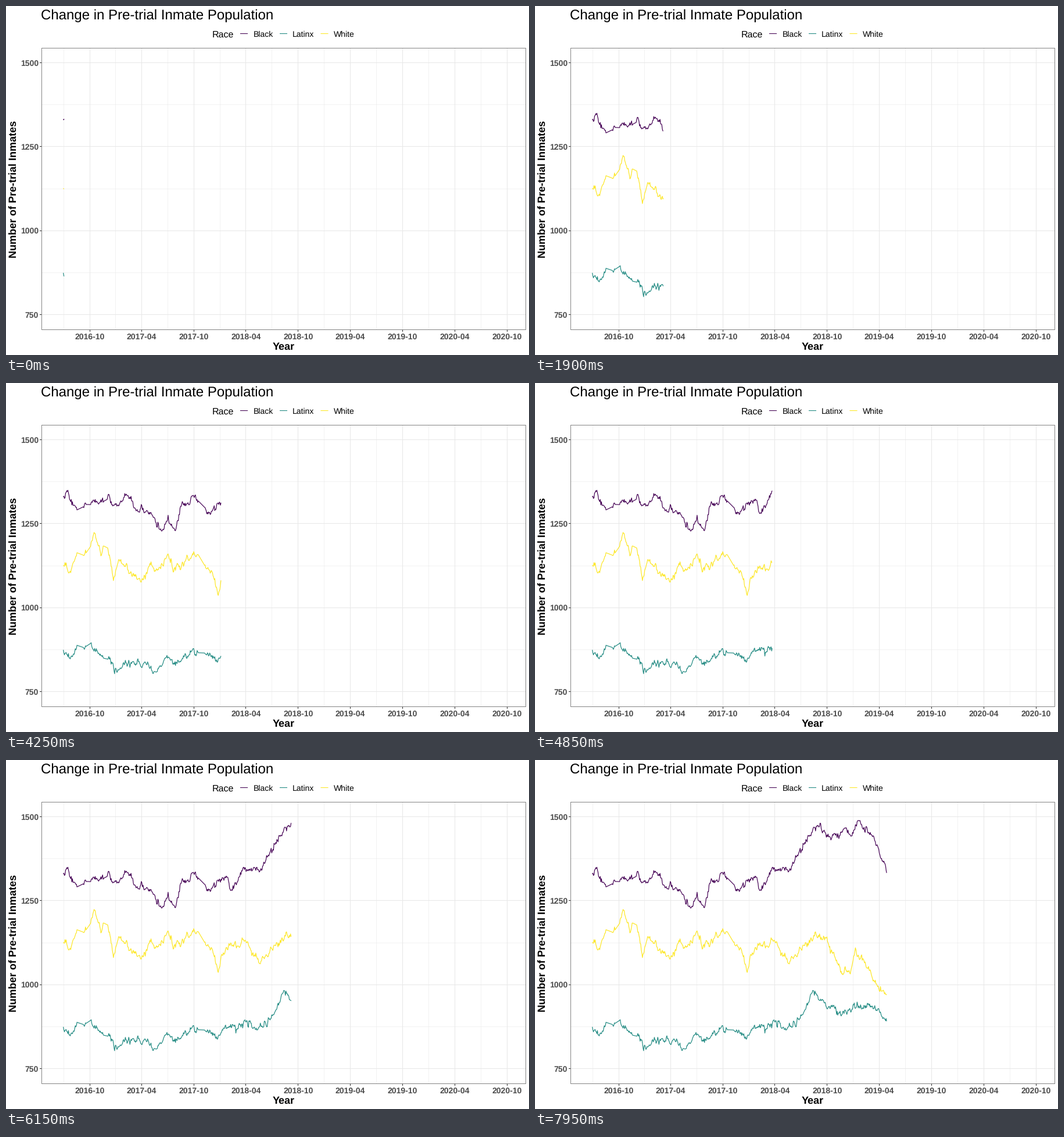
Recreate the animation shown at these times as a matplotlib script. Size 900 by 600 pixels, loop 8 s.

```python
import numpy as np
import matplotlib
import matplotlib.pyplot as plt
from matplotlib.animation import FuncAnimation

matplotlib.rcParams["font.family"] = "Liberation Sans"
matplotlib.rcParams["text.hinting"] = "none"

W, H, DPI = 900, 600, 100
PT = 72 / DPI                      # points per pixel
FRAMES, INTERVAL = 160, 50
START, SPEED = 99.8, 3.1777        # reveal edge: first position, px per frame
LEFT, RIGHT, TOP, BOTTOM = 61.5, 894.5, 72.5, 556.5
GRID, DARK, GREY = "#E8E8E8", "#333333", "#4D4D4D"

# stretches without observations, bridged by straight lines
GAPS = [(122.5, 132), (138, 145.5), (169, 174), (331.5, 341)]

# main turns of each trend, in pixels
BLACK = [(98, 199), (105, 187), (119, 216), (147, 204), (180, 200),
         (186, 218), (207, 189), (228, 216), (250, 224), (266, 254),
         (278, 233), (290, 256), (301, 214), (322, 194), (350, 220),
         (378, 198), (390, 222), (408, 190), (437, 186), (487, 114),
         (508, 134), (535, 122), (544, 141), (555, 101), (580, 130),
         (606, 188)]
LATINX = [(98, 458), (110, 472), (122, 459), (146, 449), (162, 468),
          (178, 472), (186, 492), (197, 492), (207, 479), (235, 483),
          (262, 494), (276, 470), (290, 486), (306, 469), (350, 460),
          (365, 482), (374, 458), (400, 461), (411, 447), (437, 462),
          (460, 439), (477, 398), (503, 421), (528, 439), (550, 422),
          (585, 426), (606, 448)]
WHITE = [(98, 311), (110, 325), (122, 297), (138, 293), (153, 263),
         (164, 290), (175, 288), (185, 333), (195, 309), (236, 339),
         (248, 309), (262, 329), (278, 292), (288, 319), (300, 318),
         (323, 290), (347, 312), (365, 361), (374, 328), (390, 314),
         (415, 315), (437, 349), (465, 318), (486, 302), (502, 312),
         (528, 360), (543, 362), (552, 325), (594, 396), (606, 408)]


def daily(turns, seed, step=0.98, memory=0.65, spread=3):
    """Trend through the turns plus day-to-day noise that fades slowly."""
    x = np.arange(98.6, 606.5, step)
    shocks = np.random.default_rng(seed).normal(0, spread, x.size)
    noise = np.convolve(shocks, memory ** np.arange(12))[:x.size]
    y = np.interp(x, *zip(*turns)) + np.clip(noise, -9, 9)
    seen = [not any(a < v < b for a, b in GAPS) for v in x]
    return x[seen], y[seen]


# name, colour, legend key x, legend text x, data
SERIES = [
    ("Black", "#440154", 403, 425.5, daily(BLACK, 4)),
    ("Latinx", "#218A82", 471, 492.5, daily(LATINX, 11)),
    ("White", "#FDE725", 541.5, 563.5, daily(WHITE, 23)),
]

fig = plt.figure(figsize=(W / DPI, H / DPI), dpi=DPI, facecolor="white")
ax = fig.add_axes([0, 0, 1, 1])
ax.set_xlim(0, W)
ax.set_ylim(H, 0)
ax.axis("off")


def stroke(xs, ys, color, width=1.07, z=1):
    line, = ax.plot(xs, ys, color=color, lw=width * PT, zorder=z, snap=False,
                    solid_capstyle="butt", solid_joinstyle="round")
    return line


def label(x, y, text, size, color="black", **kw):
    ax.text(x, y, text, fontsize=size * PT, color=color, va="baseline",
            rotation_mode="anchor", **kw)


def middles(v):
    return (v[1:] + v[:-1]) / 2


def grid(xs, ys, width, z):
    for x in np.floor(xs) + 0.5:
        stroke([x, x], [TOP, BOTTOM], GRID, width, z)
    for y in np.floor(ys) + 0.5:
        stroke([LEFT, RIGHT], [y, y], GRID, width, z)


# half-year ticks, placed by true day counts
dates = np.arange("2016-10", "2020-11", 6, dtype="datetime64[M]")
days = (dates.astype("datetime64[D]") - np.datetime64("2016-10-01")).astype(int)
xticks = 144 + days * 718 / 1461
yticks = 97.5 + 144.35 * np.arange(4)

grid(np.append(99, middles(xticks)), middles(yticks), 0.53, 0)
grid(xticks, yticks, 1.07, 1)
stroke([LEFT, RIGHT, RIGHT, LEFT, LEFT], [TOP, TOP, BOTTOM, BOTTOM, TOP],
       DARK, 0.6, 5)

for x, date in zip(xticks, dates):
    tick = np.floor(x) + 0.5
    stroke([tick, tick], [557, 560], DARK)
    label(x, 573, str(date), 14, GREY, ha="center", weight="bold")
for i, y in enumerate(yticks):
    tick = np.floor(y) + 0.5
    stroke([58, 61], [tick, tick], DARK)
    label(55.8, y + 5, str(1500 - 250 * i), 14, GREY,
          ha="right", weight="bold")

label(60.5, 23.3, "Change in Pre-trial Inmate Population", 24)
label(477.5, 591, "Year", 18, ha="center", weight="bold")
label(18, 314.5, "Number of Pre-trial Inmates", 18, ha="center",
      rotation=90, weight="bold")
label(355, 53.7, "Race", 16)

curves = []
for name, color, key_x, text_x, _ in SERIES:
    stroke([key_x, key_x + 13], [47.5, 47.5], color)
    label(text_x, 53, name, 14)
    curves.append(stroke([], [], color, 1.2, 3))


def draw(i):
    edge = START + SPEED * i
    for curve, (*_, (x, y)) in zip(curves, SERIES):
        shown = x < edge
        curve.set_data(np.append(x[shown], edge),
                       np.append(y[shown], np.interp(edge, x, y)))
    return curves


anim = FuncAnimation(fig, draw, frames=FRAMES, interval=INTERVAL,
                     repeat=True, repeat_delay=0, blit=False)
plt.show()
```
